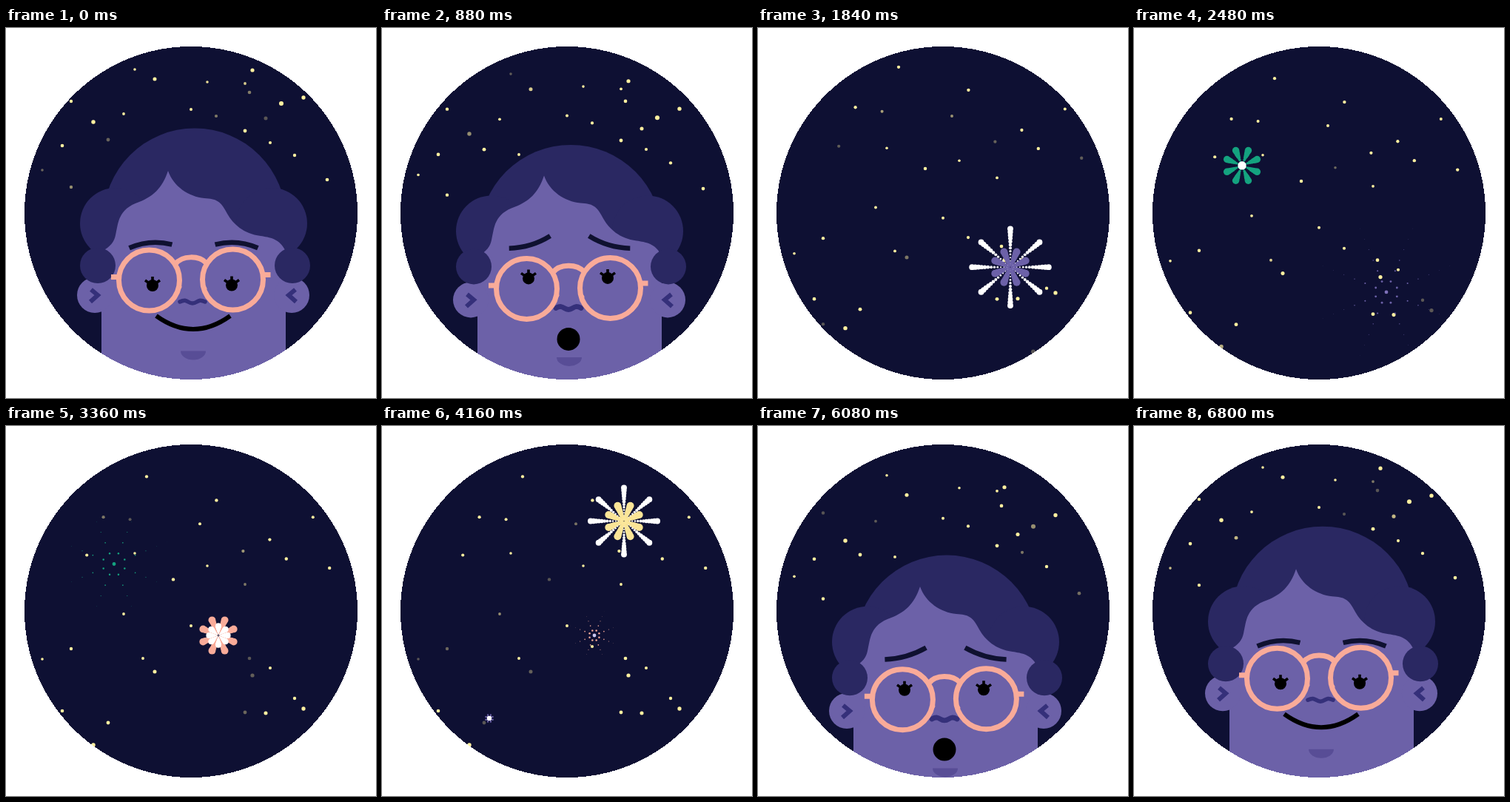
An HTML page with a canvas that plays this animation: 500x500 px, repeating every 6.88 s.

```html
<!DOCTYPE html>
<html lang="en">
<head>
<meta charset="utf-8">
<title>Night sky</title>
<style>
html, body { margin: 0; width: 100%; height: 100%; overflow: hidden; background: #fff; }
canvas { display: block; width: 500px; height: 500px; }
</style>
</head>
<body>
<canvas id="stage" width="500" height="500"></canvas>
<script>
const ctx = document.getElementById('stage').getContext('2d');
const LOOP = 6880, STEP = 80, TAU = Math.PI * 2, HEAD_TRAVEL = 425, BURST_TRAVEL = 412;
const SKY = '#0e1033', STAR = '#fff0a0', SKIN = '#6c61a8', HAIR = '#2a2862';
const FRAME = '#f9ab99', CHIN = '#584d96', LINE = '#35307a', BROW = '#0f1130';

const clamp = v => Math.max(0, Math.min(1, v));
const ramp = (t, a, b) => clamp((t - a) / (b - a));
const smooth = v => v * v * (3 - 2 * v);
const mix = (a, b, k) => a + (b - a) * k;
const hash = n => { const v = Math.sin(n * 127.1 + 11.7) * 43758.5453; return v - Math.floor(v); };

// Key stars around the head: x, y, travel while looking up
const stars = [
  [174, 56, 116], [201, 69, 263], [272, 73, 116], [323, 75, 139], [333, 57, 280], [329, 87, 227],
  [372, 102, 366], [402, 94, 288], [88, 99, 202], [118, 127, 304], [159, 116, 138], [250, 110, 160],
  [284, 119, 179], [351, 122, 266], [323, 139, 248], [357, 155, 172], [390, 172, 196], [434, 205, 230],
  [76, 159, 226], [49, 192, 123], [88, 215, 202], [138, 151, 250], [185, 163, 151]
];
// More stars come into view from above
for (let i = 0; i < 13; i++) {
  stars.push([50 + 400 * ((i * .618 + .35) % 1), -130 + 130 * hash(i + 3), 150 + 60 * hash(i + 90)]);
}

const bursts = [
  { x: 341, y: 357.5, start: 1440, scale: 1, color: SKIN, core: '#7d70b8' },
  { x: 146, y: 186.5, start: 2240, scale: 1, color: '#14a37f', core: '#14a37f' },
  { x: 287, y: 283, start: 3040, scale: .45, color: FRAME, core: '#c9c6ee' },
  { x: 327, y: 128.5, start: 3760, scale: .87, color: '#fbe597', core: STAR },
  { x: 145, y: 395, start: 4080, scale: 1, color: SKIN, core: '#fff' }
];

// Strong ease in and out: bezier (.85, 0, .15, 1)
function ease(x) {
  let lo = 0, hi = 1;
  for (let i = 0; i < 24; i++) {
    const s = (lo + hi) / 2, q = 1 - s;
    if (2.55 * s * q * q + .45 * s * s * q + s * s * s < x) lo = s; else hi = s;
  }
  return smooth(lo);
}

function disc(x, y, r, color) {
  if (r <= 0) return;
  ctx.fillStyle = color;
  ctx.beginPath();
  ctx.arc(x, y, r, 0, TAU);
  ctx.fill();
}

function stroke(color, width, cap, draw) {
  ctx.strokeStyle = color;
  ctx.lineWidth = width;
  ctx.lineCap = cap;
  ctx.beginPath();
  draw();
  ctx.stroke();
}

function shifted(y, draw, x = 0) {
  ctx.save();
  ctx.translate(x, y);
  draw();
  ctx.restore();
}

// Round window with a crisp, stepped edge
function porthole(c, r) {
  const path = new Path2D();
  for (let y = c - r; y < c + r; y++) {
    const half = Math.round(Math.sqrt(r * r - (y + .5 - c) ** 2));
    path.rect(c - half, y, half * 2, 1);
  }
  return path;
}
const hole = porthole(250, 225);

function drawStars(t, pan) {
  stars.forEach(([x, y, travel], i) => {
    const turns = 4 + Math.floor(hash(i) * 4);
    const wave = .5 + .5 * Math.cos(TAU * (turns * t / LOOP + hash(i + 50)));
    ctx.globalAlpha = clamp(.3 + wave * 5);
    disc(x, y + travel * pan, 1.2 + travel / 200, STAR);
  });
  ctx.globalAlpha = 1;
}

function drawBurst(t, pan, { x, y, start, scale, color, core }) {
  const age = t - start;
  if (age < 0 || age > 1850) return;
  const cy = y - BURST_TRAVEL * (1 - pan);
  const grow = smooth(ramp(age, 0, 260));
  const bloom = ramp(age, 240, 400);
  const fly = smooth(ramp(age, 400, 960));
  const fade = ramp(age, 960, 1500);
  const shoot = smooth(ramp(age, 220, 410)) * (1 + .35 * ramp(age, 420, 800));
  const shrink = ramp(age, 0, 110) * (1 - ramp(age, 450, 760));
  const dot = (angle, dist, r, c) => disc(x + Math.cos(angle) * dist, cy + Math.sin(angle) * dist, r, c);
  for (let i = 0; i < 8; i++) {
    for (let k = 1; k <= 8; k++) {
      const gap = mix(2.8 * grow, 15.5 * scale, fly);
      const petal = mix(.6 * k, 1.8 + .4 * k, bloom) * grow;
      const spark = 2.2 * .75 ** k - 1.4 * fade;
      dot((i + .5) * TAU / 8, gap * k, mix(petal, spark, fly), color);
    }
  }
  if (age > 480) disc(x, cy, 2.4 * (1 - ramp(age, 1700, 1850)), core);
  for (let i = 0; i < 8; i++) {
    const angle = i * TAU / 8;
    const bent = angle - .08 * Math.sin(2 * angle);
    for (let k = 1; k <= 12; k++) dot(bent, 4.35 * scale * shoot * k, .33 * k * shrink, '#fff');
  }
}

function drawFace() {
  ctx.fillStyle = SKIN;
  ctx.beginPath();
  ctx.moveTo(219, 193);
  ctx.bezierCurveTo(211, 217, 198, 228, 180, 235);
  ctx.bezierCurveTo(151, 245, 152, 263, 148, 280);
  ctx.bezierCurveTo(146, 289, 142, 295, 129, 302);
  ctx.lineTo(129, 620);
  ctx.lineTo(378, 620);
  ctx.lineTo(378, 302);
  ctx.bezierCurveTo(370, 284, 356, 283, 344, 281);
  ctx.bezierCurveTo(321, 278, 307, 265, 299, 251);
  ctx.bezierCurveTo(290, 233, 284, 231, 268, 230);
  ctx.bezierCurveTo(247, 228, 226, 214, 219, 193);
  ctx.fill();
}

function ear(x, dir) {
  disc(x, 361, 24, SKIN);
  stroke(LINE, 6, 'butt', () => {
    ctx.moveTo(x - 5 * dir, 353.5);
    ctx.lineTo(x + 4 * dir, 361);
    ctx.lineTo(x - 6 * dir, 370);
  });
}

function eye(x, y) {
  disc(x, y, 8, '#000');
  stroke('#000', 3.6, 'butt', () => {
    for (const side of [-1, 0, 1]) {
      ctx.moveTo(x, y);
      ctx.lineTo(x + 10 * side, y - 12 + 5 * side * side);
    }
  });
}

function brow(side, look) {
  ctx.save();
  ctx.translate(253.5 + side * mix(58, 54, look), mix(295, 267, look));
  ctx.rotate(side * mix(.08, .29, look));
  stroke(BROW, 6.5, 'butt', () => {
    ctx.moveTo(-29, 0);
    ctx.quadraticCurveTo(0, mix(-10, 8, look), 29, 0);
  });
  ctx.restore();
}

function glasses() {
  stroke(FRAME, 7, 'butt', () => {
    ctx.arc(193.5, 341, 41, 0, TAU);
    ctx.moveTo(347.5, 340);
    ctx.arc(306.5, 340, 41, 0, TAU);
    ctx.moveTo(229, 319);
    ctx.bezierCurveTo(238, 307, 261, 307, 271, 318);
    ctx.moveTo(142, 336.5);
    ctx.lineTo(152, 336.5);
    ctx.moveTo(348, 333.5);
    ctx.lineTo(357.5, 333.5);
  });
  stroke(FRAME, 5, 'round', () => {
    for (const side of [-1, 1]) {
      ctx.moveTo(251 + 18 * side, 352);
      ctx.lineTo(251 + 16 * side, 350);
    }
  });
}

function noseAndChin(look) {
  ctx.fillStyle = CHIN;
  ctx.beginPath();
  ctx.ellipse(253, 436.5, 17, 12, 0, 0, Math.PI);
  ctx.fill();
  stroke(LINE, mix(5.5, 7, look), 'round', () => {
    ctx.moveTo(235, 370);
    ctx.bezierCurveTo(245, 365, 245, 372, 252, 372);
    ctx.bezierCurveTo(259, 372, 259, 365, 269, 370);
  });
}

function mouth(look) {
  const smile = 1 - smooth(ramp(look, .2, .8));
  if (smile > .04) {
    const y = 398 - 9 * smile;
    stroke('#000', 6, 'butt', () => {
      ctx.moveTo(253 - 50 * smile, y);
      ctx.quadraticCurveTo(253, y + 36 * smile, 253 + 50 * smile, y);
    });
  }
  disc(252, 398, 15.5 * smooth(ramp(look, .45, .9)), '#000');
}

// Each part lags the head by its own amount as it tilts back
function drawHead(look) {
  disc(255, 259, 123.5, HAIR);
  shifted(-12 * look, () => {
    disc(148, 264, 48, HAIR);
    disc(359, 264, 48, HAIR);
  });
  shifted(-16 * look, () => {
    drawFace();
    ear(120, 1);
    ear(386, -1);
  });
  shifted(-21 * look, () => {
    disc(124, 321, 24, HAIR);
    disc(387, 321, 24, HAIR);
  });
  shifted(-14 * look, () => noseAndChin(look));
  mouth(look);
  shifted(-32 * look, () => {
    eye(198, 348);
    eye(305, 347.5);
  });
  brow(-1, look);
  brow(1, look);
  shifted(-11 * look, glasses, 2 * look);
}

function draw(t) {
  const pan = ease(ramp(t, 230, 2610)) - ease(ramp(t, 4490, 6880));
  const look = smooth(ramp(t, 260, 820)) - smooth(ramp(t, 6000, 6560));
  ctx.fillStyle = '#fff';
  ctx.fillRect(0, 0, 500, 500);
  ctx.save();
  ctx.clip(hole);
  ctx.fillStyle = SKY;
  ctx.fillRect(0, 0, 500, 500);
  drawStars(t, pan);
  for (const b of bursts) drawBurst(t, pan, b);
  shifted(HEAD_TRAVEL * pan, () => drawHead(look));
  ctx.restore();
}

const begin = performance.now();
function tick() {
  const t = (performance.now() - begin) % LOOP;
  draw(Math.floor(t / STEP) * STEP);
  requestAnimationFrame(tick);
}
tick();
</script>
</body>
</html>
```
